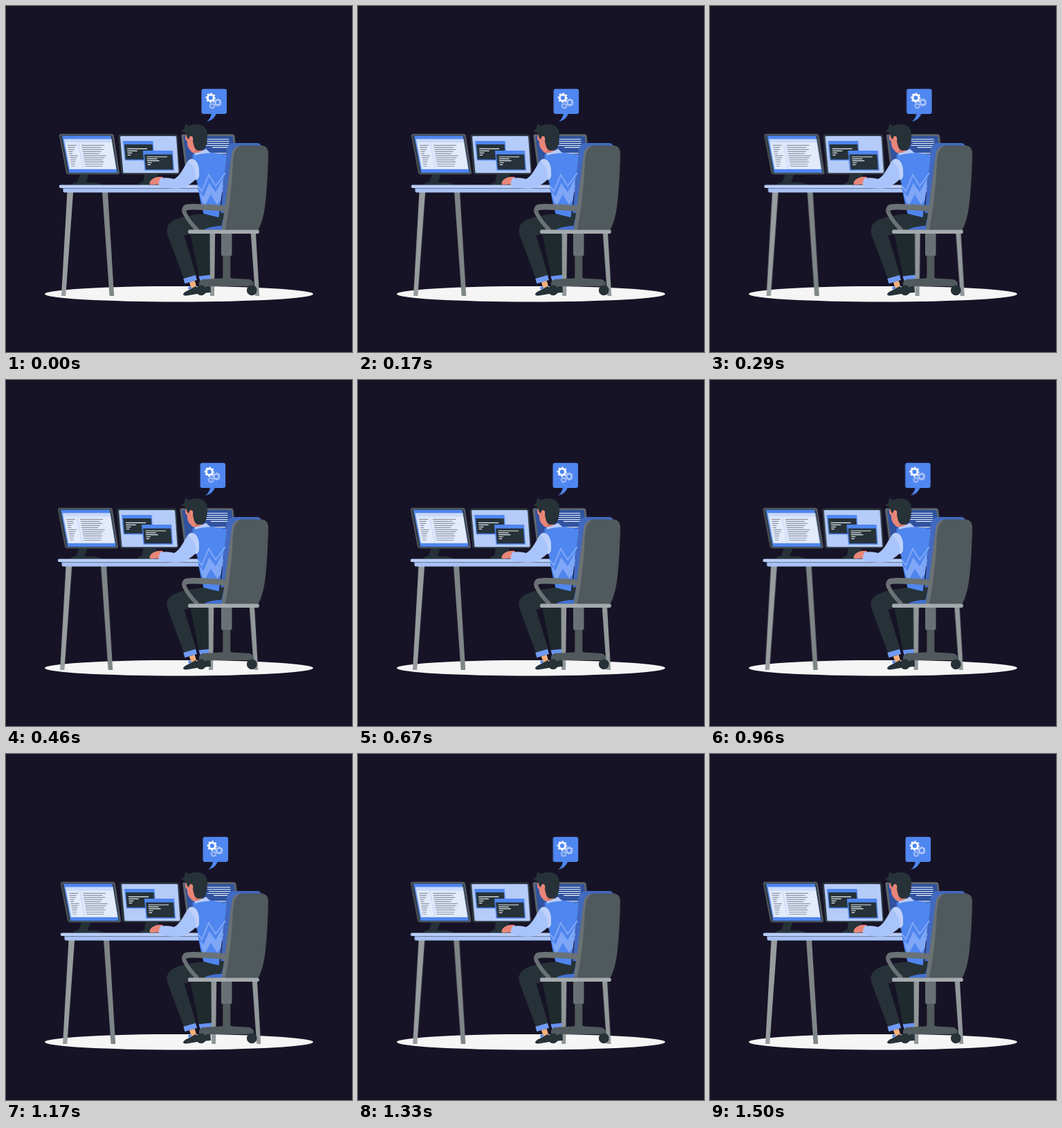
Animation, 500 px wide and 500 px high, one loop 1.54 s. Source, as an HTML page:

```html
<!DOCTYPE html>
<html lang="en">
<head>
<meta charset="utf-8">
<title>Developer at work</title>
<style>
  html, body { margin: 0; width: 100%; height: 100%; overflow: hidden; background: #171326; }
  svg { display: block; width: 100%; height: 100%; }

  .shake { animation: shake 1540ms linear infinite; }
  @keyframes shake {
    0%, 97.403%, 100% { transform: translateX(0); }
    8.117% { transform: translateX(-.83px); }
    17.857% { transform: translateX(2.17px); }
    27.597%, 47.078%, 66.558% { transform: translateX(-3.83px); }
    37.338%, 56.818% { transform: translateX(4.17px); }
    76.299% { transform: translateX(2.17px); }
    86.039% { transform: translateX(-.83px); }
    95.779% { transform: translateX(.17px); }
  }

  .blue { fill: #4f86ef; }
  .pale { fill: #b5cbf9; }
  .dark { fill: #263238; }
  .skin { fill: #e98578; }
  .line { fill: none; stroke-width: 1.2; }
  .code { stroke: #e8edf2; }
  .text { stroke: #8b96a8; }
</style>
</head>
<body>
<svg viewBox="0 0 500 500">
  <ellipse cx="250" cy="416.2" rx="194" ry="11.3" fill="#f5f5f5"/>

  <g class="shake">
    <!-- table legs -->
    <path d="M88.5 268h8.7L86.3 419H80z" fill="#979c9e"/>
    <path d="M139 268h8l9.2 151h-6.6z" fill="#7e8587"/>

    <!-- right monitor -->
    <path d="M256 185.3h71q3 0 3.4 3l6 55h-76l-7-55q-.4-3 2.600-3z" fill="#5f686d"/>
    <path d="M256.500 188h71l6 52h-71z" fill="#31539f"/>
    <path class="line" stroke="#e6edfb" d="M288 192.500h34M289 195.500h33.500M291 198.500h31.500M289 201.500h33.500M298 204.300h24M290 212.800h29M290 215.800h29M290 218.800h29"/>

    <!-- left monitor -->
    <path d="M80 184.800h72q3.200 0 3.800 3l8 52q.5 3.500-2.500 3.500H91q-3.200 0-4-3l-10-52q-.5-3.500 3-3.500z" fill="#596166"/>
    <path d="M80.500 186.500h70.500q2.300 0 2.800 2.300l8 51q.4 2.300-2 2.300H91q-2 0-2.600-2.400l-10-50.500q-.4-2.700 2.100-2.700z" fill="#303b42"/>
    <path class="blue" d="M81 187.500h70.500l9.300 53.500H91.200z"/>
    <path d="M83.500 192.300h69l7 43.700H91.700z" fill="#c9d9fa"/>
    <path d="M85.800 197.500H104l7.200 37.500H92.800z" fill="#e3ebfb"/>
    <path d="M105.300 197.500h47.600l5.800 37.500h-46.200z" fill="#e3ebfb"/>
    <g id="notes" class="line text"></g>
    <path class="dark" d="M107 243h13l-4.500 11.500q23 .5 23.500 4H95q1-3.500 8-4.300z"/>

    <!-- middle monitor -->
    <path d="M165.500 185.500h80q2.500 0 2.700 2.500l3 52q.2 3.300-3 3.300h-79q-2.500 0-2.800-2.500l-4-52q-.1-3.300 3.100-3.300z" fill="#2d383f"/>
    <path class="pale" d="M166 188h78.500q1.500 0 1.600 1.500l3.400 50q0 1.800-1.500 1.800h-77q-1.600 0-1.700-1.500l-4.300-50q0-1.800 1-1.800z"/>
    <path class="blue" d="M169 195h43.500l2 28.300h-42.700z"/>
    <path class="dark" d="M171 200h40.500l1.500 21.800h-40.200z"/>
    <path class="blue" d="M197.800 209H241l2 28.700h-42.500z"/>
    <path class="dark" d="M200 214.500h40l1.500 21.700h-39.700z"/>
    <path class="line code" d="M175 206.400h29M175.200 209.400h14.500M175.500 212.400h6.800M175.700 215.300h4.500M203.500 218h29.500M203.700 220.800h15M204 223.600h17.500M204.300 226.500h6.500M204.600 229.300h4.500"/>
    <path class="dark" d="M200 243h19v11.500q16 .5 17 4h-45q1-3.500 7-4.300z"/>

    <!-- table top -->
    <path d="M82.500 262H340v7.500H84.500q-2 0-2-2z" fill="#a9c2f3"/>
    <rect x="83" y="262.600" width="257" height="1.300" fill="#5f719b"/>
    <rect x="76.800" y="258.400" width="265" height="4.600" rx="2" fill="#b9cef9"/>

    <!-- speech bubble -->
    <rect class="blue" x="282.500" y="119.800" width="36.500" height="36.300" rx="3"/>
    <path class="blue" d="M297 155h7q-3 9.500-14 12.300 6-5 7-12.300z"/>
    <g id="gears" fill="none"></g>
  </g>

  <path d="M266 327h31.500l-.8 64H279z" fill="#1f2a2f"/>
  <path d="M278.500 390.500l18.500-2v6.500l-16.500 2.500z" fill="#6794f2"/>

  <g class="shake">
    <path d="M294.500 325h7.700L301 419h-6z" fill="#92989a"/>
    <path d="M353.500 325h7.300l5.400 94h-6z" fill="#92989a"/>
  </g>

  <!-- chair back -->
  <path d="M308 322l10-108q1-16 12-16h33q4 0 6 4l-40 121z" fill="#4169c0"/>
  <path d="M264 323.500q2-6 8-6h46v6z" fill="#426fd2"/>

  <!-- legs and shoes -->
  <path class="dark" d="M304 299q-32 1-54 7.500-17 5.500-17.500 17 0 5 3 12.500l21.500 58 17.500-5.500-17-57q15-2.500 28-8 8-5 26-6l4-18z"/>
  <path d="M256.300 394l17.700-5.300 2 7.300-17.500 5.300z" fill="#6f9bf5"/>
  <path d="M265 399.300l7.700-2.300 2.500 8.500-7.500 3z" fill="#f2b07c"/>
  <path d="M263.500 406l4-.8.5 3-4.500 1.500z" fill="#4f86ef"/>
  <path class="dark" d="M256 416.500q1-3 7-5.500l11-6 4 3q7-3 17.500-3.500l.5 9.500-15 1.200-18 3q-6.500 1.200-7-1.700z"/>

  <!-- torso -->
  <path class="blue" d="M270 214q10-4 20-3.500l29 5-3 25-8.500 65-22-5.500q-6.500-24-9-44-8-28-6.500-42z"/>
  <path fill="#80a7f6" d="M279.500 268.500l6 7.500 8-20 9.500 13 11-20-3.500 31-5.500 7-9-14.500-9.500 17-4-10z"/>
  <path class="line" stroke="#80a7f6" d="M277.500 260l5.500 8 10-24 10 16 14-19" style="stroke-width:2"/>

  <!-- head -->
  <path class="skin" d="M263 181l-4 7 .3 5 2.500 2.500q0 9 4.500 13 3 4 6.500 4.500l9-1 4-13-8-16z"/>
  <path d="M273 208.500l8 2 9-4 1 5-12 3-6-3z" fill="#d66f68"/>
  <path class="pale" d="M272.500 212.500q8-1 16.500-6l6.500 6q-14 0-22 3.500z"/>
  <path class="dark" d="M258 186l1-3q-4 0-6-3.500l4-.5q1-6 3.500-9l3 3.500q4-2.500 14-2.500 13.500 1.500 13.500 15.500 0 11-2.500 17-3 5.500-9.500 5.500-5 0-7-5.500l-2-8q-1-5-4-5.500l-1.500 5-1.500-7-2-1.500z"/>
  <path class="skin" d="M264 193q.5-5 3.500-5t2.800 5-3 5.500-3.300-5.500z"/>
  <path class="dark" d="M260.500 187.500l3.200-1 .8 5-1.500 1z"/>

  <!-- arm -->
  <path class="skin" d="M207.500 255.500q1-4 6-6.500 5-3 13-2l3 12q-8 .5-11-1.500l-6.500.8q-4.500.5-4.500-2.800z"/>
  <path d="M223 249q10-2 20 1 6-3 12-13l7-12q6-6 12-1.500 6 6 5 20.500-2 6-17 16-5 4-15 3.800-15 .2-25-3.300l-1.500-4.500z" fill="#a9c4fa"/>
  <path d="M263 224q5-6 11-.5 6 6 5 23-2 5-5 5 2-17-11-27.500z" fill="#bdd1fb"/>

  <!-- chair front -->
  <path d="M312 323l14-108q2-13 13-13h8l-24 121z" fill="#6a7275"/>
  <path d="M317 323q9-45 11-99 1-19 12-22.500h29q10 .5 10 12-1 48-5 78-2.500 18-9 31.500z" fill="#50595c"/>
  <g fill="none" stroke="#6a7275" stroke-linejoin="round">
    <path d="M321 293q-25-3-52-2.800-7 0-10.500 2" stroke-width="8.500"/>
    <path d="M263 289q-9 2.500-4.500 11 6 12 18.500 24" stroke-width="5.800"/>
  </g>
  <rect x="311" y="326" width="15.500" height="35.500" rx="3" fill="#697174"/>
  <rect x="313.300" y="361" width="11" height="34" fill="#50595c"/>
  <path d="M279 405q-1-8 5-10l27-1.500q8-2.500 16 0l25 1.500q7 2 6 10z" fill="#50595c"/>
  <rect x="263" y="323.300" width="102.800" height="5.800" rx="2.500" fill="#a5abad"/>
  <circle class="dark" cx="282" cy="410.800" r="7.400"/>
  <circle class="dark" cx="355.300" cy="410.800" r="7.400"/>
</svg>
<script>
  const NS = "http://www.w3.org/2000/svg";
  const add = (parent, tag, attrs) => {
    const el = document.createElementNS(NS, tag);
    for (const k in attrs) el.setAttribute(k, attrs[k]);
    parent.append(el);
  };

  // slanted text columns
  const column = (x, y, step, widths) =>
    widths.map((w, i) => `M${x + i * step * 0.18} ${y + i * step}h${w}`).join("");
  add(document.getElementById("notes"), "path", {
    d: column(89, 201.3, 3.02, [13, 10, 9, 6, 5, 12, 10, 8, 7, 6, 5]) +
       column(109, 201.3, 3.02, [33, 28, 31, 27, 24, 33, 30, 27, 28, 26, 25])
  });

  // ring plus eight teeth
  const gears = document.getElementById("gears");
  const gear = (cx, cy, r, stroke) => {
    const mid = r * 0.66, pitch = Math.PI * (r * 0.92) / 4;
    add(gears, "circle", { cx, cy, r: mid, stroke, "stroke-width": r * 0.4 });
    add(gears, "circle", {
      cx, cy, r: r * 0.92, stroke, "stroke-width": r * 0.28,
      "stroke-dasharray": `${pitch * 0.5} ${pitch * 0.5}`,
      "stroke-dashoffset": pitch * 0.25
    });
  };
  gear(295.8, 132.7, 6.8, "#fff");
  gear(306, 139.4, 5.5, "#b7ccfa");
  gear(298, 144.4, 4.3, "#a3bdf7");
</script>
</body>
</html>
```
